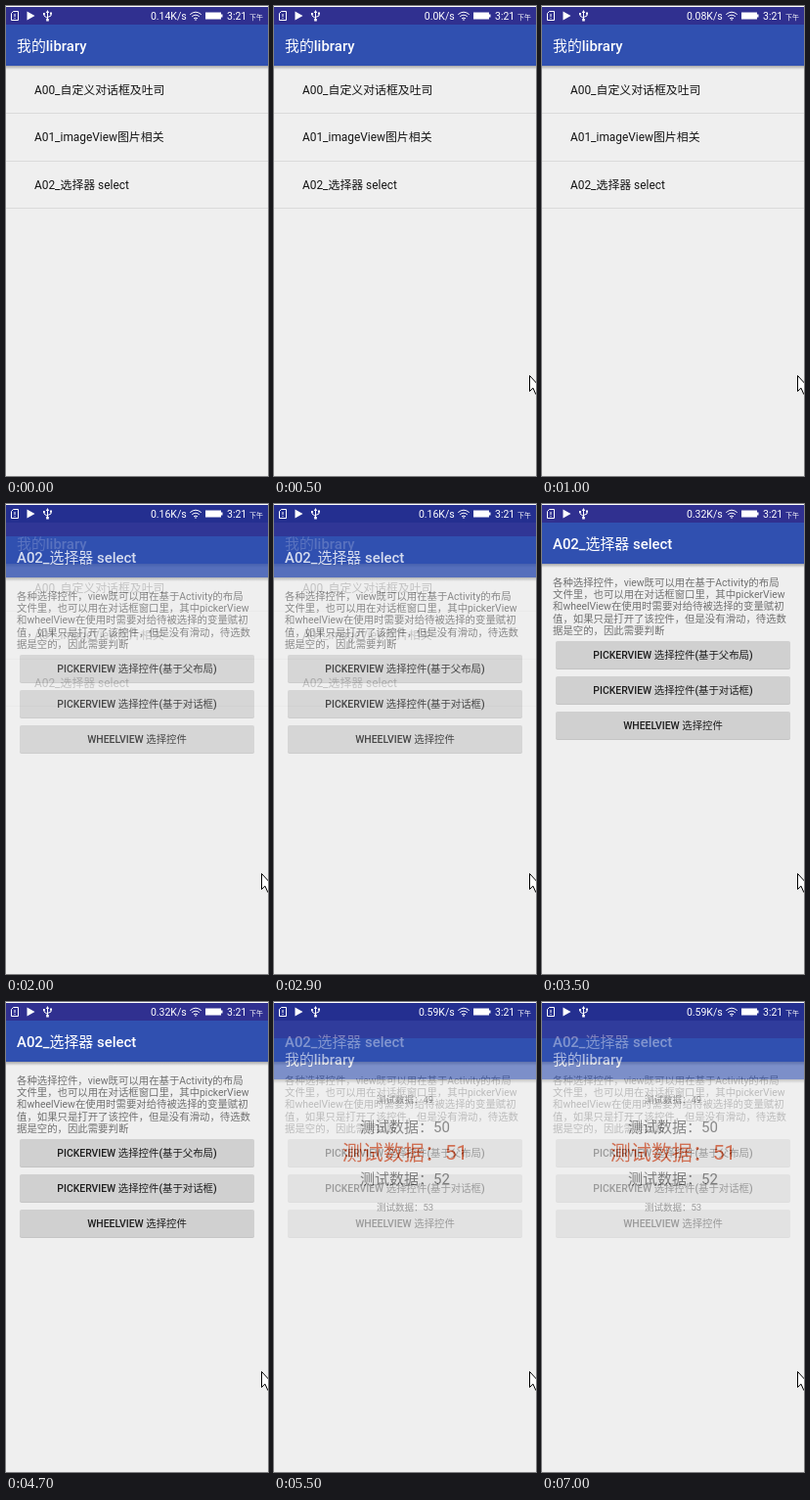
Write an HTML page that moves like this. It is 268 by 480 pixels and loops after 8 s.

```html
<!DOCTYPE html>
<html lang="zh-CN">
<head>
<meta charset="utf-8">
<style>
html, body { margin: 0; width: 100%; height: 100%; overflow: hidden; background: #efefef; }
svg { display: block; width: 268px; height: 480px; font-family: Roboto, "Noto Sans CJK SC", "Noto Sans CJK", sans-serif; }
text { white-space: pre; }
</style>
</head>
<body>
<svg id="stage" viewBox="0 0 268 480">
  <defs>
    <linearGradient id="shade" x2="0" y2="1">
      <stop stop-color="#000" stop-opacity=".3"/>
      <stop offset="1" stop-color="#000" stop-opacity="0"/>
    </linearGradient>
  </defs>
  <g id="under"></g>
  <g id="over"></g>
  <rect id="bar" width="268" height="19"/>
  <rect width="268" height="1" fill="#fff"/>
  <g fill="none" stroke="#fff">
    <path d="M7.5 5.5H12.5V14.5H5.5V7.5Z M9 8V11 M9 12V13"/>
    <path d="M21.5 5.5L29.5 10L21.5 14.5Z" fill="#fff" stroke="none"/>
    <path d="M42.5 6V14 M39 8.5V10L42.5 12.5 M46 7.5V10L42.5 11.5"/>
    <path d="M40.8 7L42.5 4L44.2 7Z M38 7h2v2h-2Z M45 6.5h2v2h-2Z M41.2 13h2.6v2.4h-2.6Z" fill="#fff" stroke="none"/>
    <path d="M188.3 8.6Q194 3.8 199.7 8.6 M190.2 10.8Q194 7.6 197.8 10.8 M192 12.8Q194 11.2 196 12.8"/>
    <circle cx="194" cy="14" r=".8" fill="#fff" stroke="none"/>
    <path d="M204 6.5H220V8.5H221.5V11.5H220V13.5H204Z" fill="#fff" stroke="none"/>
  </g>
  <g fill="#fff" font-size="10.5">
    <text id="speed" x="184.7" y="14" text-anchor="end"></text>
    <text x="226" y="14">3:21</text>
    <text x="249" y="13.5" font-size="7">下午</text>
  </g>
  <path id="cursor" d="M261.5 377.5V393.5L265 390.2L267.8 396.5H270.5L268.5 389.5H272.5Z" fill="#fff" stroke="#000"/>
</svg>
<script>
const el = id => document.getElementById(id);

const text = (x, y, size, str, attrs = '') =>
  `<text x="${x}" y="${y}" font-size="${size}" ${attrs}>${str}</text>`;

// Chinese glyphs stay regular beside medium Latin ones
const medium = (x, y, size, str, attrs = '') =>
  text(x, y, size, str.replace(/[\u4e00-\u9fff]+/g, '<tspan font-weight="400">$&</tspan>'),
    `font-weight="500" ${attrs}`);

const page = (title, body) => `
  <rect width="268" height="480" fill="#efefef"/>
  ${body}
  <rect width="268" height="19" fill="#303090"/>
  <rect y="19" width="268" height="42" fill="#3050b0"/>
  <rect y="61" width="268" height="4" fill="url(#shade)"/>
  ${medium(11, 46, 14.9, title, 'fill="#fff"')}`;

const rows = ['A00_自定义对话框及吐司', 'A01_imageView图片相关', 'A02_选择器 select'];
const list = page('我的library', rows.map((row, i) =>
  text(29, 89.5 + i * 48.6, 11.9, row, 'fill="#161616"') +
  `<rect y="${[109, 158, 206][i]}" width="268" height="1" fill="#dadada"/>`).join(''));

const notes = [
  '各种选择控件，view既可以用在基于Activity的布局',
  '文件里，也可以用在对话框窗口里，其中pickerView',
  '和wheelView在使用时需要对给待被选择的变量赋初',
  '值，如果只是打开了该控件，但是没有滑动，待选数',
  '据是空的，因此需要判断'
];
const buttons = ['PICKERVIEW 选择控件(基于父布局)', 'PICKERVIEW 选择控件(基于对话框)', 'WHEELVIEW 选择控件'];
const button = (label, i) => {
  const y = 140 + i * 36;
  return `<rect x="14" y="${y + 1}" width="240" height="28" rx="2" fill="#c4c4c4"/>
    <rect x="14" y="${y}" width="240" height="28" rx="2" fill="#d0d0d0"/>` +
    medium(134, y + 18, 10.4, label, 'text-anchor="middle" fill="#1c1c1c"');
};
const picker = page(rows[2],
  notes.map((line, i) => text(11, 84 + i * 12.2, 10.4, line, 'fill="#707070"')).join('') +
  buttons.map(button).join(''));

// Each wheel line: baseline, size, colour
const lines = [[85, 9.5, '#666'], [114.5, 15, '#444'], [143, 21, '#d03000'], [168, 15, '#444'], [194.5, 9.5, '#666']];
const wheel = page('我的library', lines.map(([y, size, fill], i) =>
  text(134, y, size, '测试数据：' + (49 + i), `text-anchor="middle" fill="${fill}"`)).join(''));

const scenes = [
  { at: 0, speed: '0.14', under: list },
  { at: 500, speed: '0.0', under: list },
  { at: 1000, speed: '0.08', under: list },
  { at: 2000, speed: '0.16', under: list, over: picker, shift: 14, alpha: .8 },
  { at: 3500, speed: '0.32', under: picker },
  { at: 5500, speed: '0.59', under: picker, over: wheel, shift: 18, alpha: .6 }
];

let shown;
function show(scene) {
  const { at, speed, under, over = '', shift = 0, alpha = 1 } = scene;
  el('under').innerHTML = under;
  el('over').innerHTML = over;
  el('over').setAttribute('transform', `translate(0 ${shift})`);
  el('over').setAttribute('opacity', alpha);
  el('bar').setAttribute('fill', over ? '#242f90' : '#303090');
  el('speed').textContent = speed + 'K/s';
  el('cursor').style.display = at ? '' : 'none';
  shown = scene;
}

const start = performance.now();
function tick() {
  const t = (performance.now() - start) % 8000;
  const scene = scenes.findLast(s => s.at <= t);
  if (scene !== shown) show(scene);
  requestAnimationFrame(tick);
}
tick();
</script>
</body>
</html>
```
